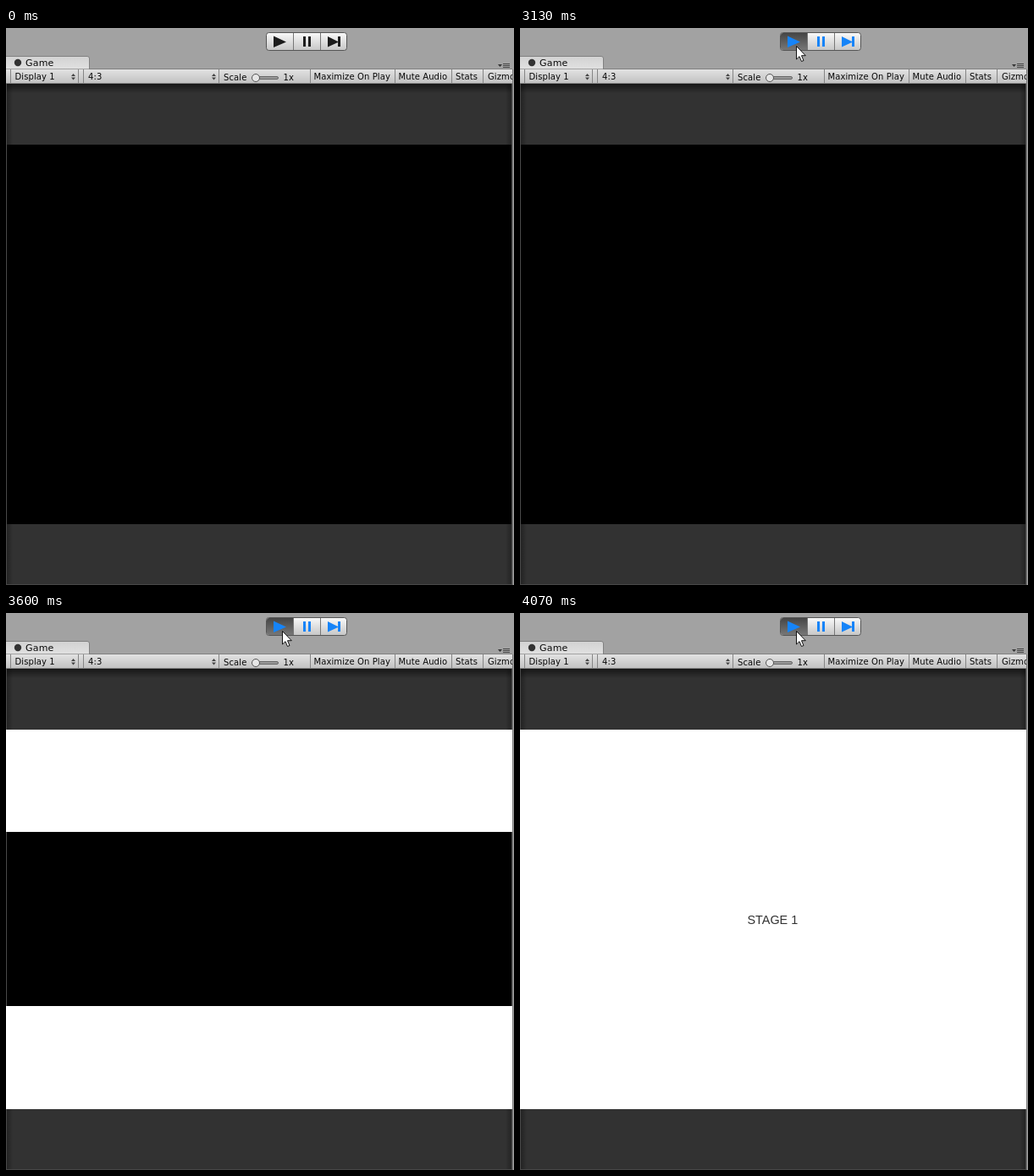
Animation of 600 by 659 pixels, one loop 8000 ms. Source, as an HTML page:

```html
<!DOCTYPE html>
<html lang="en">
<head>
<meta charset="utf-8">
<title>Game view</title>
<style>
  html, body { margin: 0; height: 100%; overflow: hidden; background: #a2a2a2; }
  svg { display: block; width: 100%; height: 100%; }
  text { font: 10px "DejaVu Sans", sans-serif; letter-spacing: .1px; fill: #080808; }
  .tab { font-size: 11px; letter-spacing: .2px; }
  .stage { font: 14.4px "Liberation Sans", Arial, sans-serif; letter-spacing: 0; fill: #323232; }
</style>
</head>
<body>
<svg viewBox="0 0 600 659">
  <defs>
    <linearGradient id="bar" x2="0" y2="1"><stop stop-color="#e2e2e2"/><stop offset="1" stop-color="#c0c0c0"/></linearGradient>
    <linearGradient id="tab" x2="0" y2="1"><stop stop-color="#d2d2d2"/><stop offset="1" stop-color="#e0e0e0"/></linearGradient>
    <linearGradient id="btn" x2="0" y2="1"><stop stop-color="#fafafa"/><stop offset="1" stop-color="#c6c6c6"/></linearGradient>
    <linearGradient id="held" x2="0" y2="1"><stop stop-color="#6a6a6a"/><stop offset="1" stop-color="#929292"/></linearGradient>
    <linearGradient id="on" x2="0" y2="1"><stop stop-color="#454545"/><stop offset="1" stop-color="#777"/></linearGradient>
    <linearGradient id="down" x2="0" y2="1"><stop stop-opacity=".55"/><stop offset="1" stop-opacity="0"/></linearGradient>
    <linearGradient id="side"><stop stop-opacity=".35"/><stop offset="1" stop-opacity="0"/></linearGradient>
  </defs>

  <rect width="600" height="659" fill="#a2a2a2"/>

  <!-- play controls -->
  <rect x="307.5" y="5.5" width="95" height="21" rx="3" fill="url(#btn)" stroke="#555"/>
  <path id="press" d="M339 6H310.500Q308 6 308 8.500V23.500Q308 26 310.500 26H339Z"/>
  <path d="M339.500 6V26M371.500 6V26" stroke="#777"/>
  <path id="icons" d="M316 9.500L331 16.500L316 23ZM351 10h3v12h-3ZM357 10h3v12h-3ZM380 10L392 16V10H395V22H392V17L380 22.500Z"/>

  <!-- tab -->
  <path d="M-.5 48V33.500H96Q98.500 33.500 98.500 36V48" fill="url(#tab)" stroke="#808080"/>
  <circle cx="14" cy="41" r="4.200" fill="#333"/>
  <text class="tab" x="23" y="45">Game</text>
  <path d="M581 43h5l-2.500 3Z" fill="#333"/>
  <path d="M587 42.500h8M587 44.500h8M587 46.500h8" stroke="#444"/>

  <!-- toolbar -->
  <rect y="49" width="598" height="17" fill="url(#bar)"/>
  <path d="M98 48.500H598M0 65.500H598" stroke="#808080"/>
  <path id="dividers" stroke="#858585"/>
  <path d="M77 57l2.500-3 2.500 3ZM77 58.500l2.500 3 2.500-3ZM243 57l2.500-3 2.500 3ZM243 58.500l2.500 3 2.500-3Z" fill="#444"/>
  <rect x="297.500" y="57.500" width="24" height="3" rx="1.500" fill="#999" stroke="#666"/>
  <circle cx="295" cy="59" r="4.500" fill="#e6e6e6" stroke="#555"/>
  <svg id="labels" width="598" height="70"></svg>

  <!-- game view -->
  <rect y="66" width="598" height="593" fill="#323232"/>
  <rect y="66" width="598" height="11" fill="url(#down)"/>
  <rect y="66" width="8" height="593" fill="url(#side)"/>
  <rect width="8" height="593" fill="url(#side)" transform="translate(598 66) scale(-1 1)"/>
  <path d="M.5 66V659M597.500 66V659M0 658.500H598" stroke="#484848"/>
  <path d="M598.500 49V659" stroke="#777"/>
  <rect x="1" y="138" width="596" height="449"/>
  <rect id="top" y="138" width="598" fill="#fff"/>
  <rect id="bottom" width="598" fill="#fff"/>
  <text id="title" class="stage" x="268.500" y="367.500">STAGE 1</text>

  <path id="cursor" d="M.5 .5V16L4 12.700L6.500 18.500L9 17.500L6.500 11.700H11.300Z" fill="#fff" stroke="#111"/>
</svg>
<script>
  const LOOP = 8000, FPS = 15;
  const $ = id => document.getElementById(id);
  const set = (id, attrs) => {
    for (const key in attrs) $(id).setAttribute(key, attrs[key]);
  };
  const show = (id, on) => set(id, { visibility: on ? "visible" : "hidden" });
  const steps = (t, start) => Math.floor((t - start) * FPS / 1000);

  set("dividers", {
    d: [5, 85, 91, 251, 359, 459, 526, 563].map(x => `M${x}.5 49V65`).join("")
  });
  $("labels").innerHTML = [
    ["Display 1", 10.5], ["4:3", 97], ["Scale", 257, 62], ["1x", 327.5, 62],
    ["Maximize On Play", 363.5], ["Mute Audio", 463.5], ["Stats", 531], ["Gizmos", 569]
  ].map(([label, x, y = 61]) => `<text x="${x}" y="${y}">${label}</text>`).join("");

  function draw(t) {
    // pointer glides in and settles on the play button
    const p = Math.min(Math.max(steps(t, 63) / 8, 0), 1);
    const ease = 1 - (1 - p) ** 2;
    show("cursor", t >= 66);
    set("cursor", {
      transform: `translate(${Math.round(368 - 42 * ease)} ${Math.round(1 + 20 * ease)})`
    });

    show("press", t >= 930);
    set("press", { fill: t < 1070 ? "url(#held)" : "url(#on)" });
    set("icons", { fill: t < 3130 ? "#1c1c1c" : "#1684f8" });

    // white shutters close from both edges
    const n = steps(t, 3463);
    const h = t < 3330 ? 0 : n < 0 ? 8 : Math.min(91 + 15 * n, 224);
    const edge = h ? 586 - h : 587;
    set("top", { height: n > 8 ? 449 : h });
    set("bottom", { y: edge, height: 587 - edge });
    show("title", n > 8);
  }

  const begin = performance.now();
  function tick() {
    draw((performance.now() - begin) % LOOP);
    requestAnimationFrame(tick);
  }
  tick();
</script>
</body>
</html>
```
